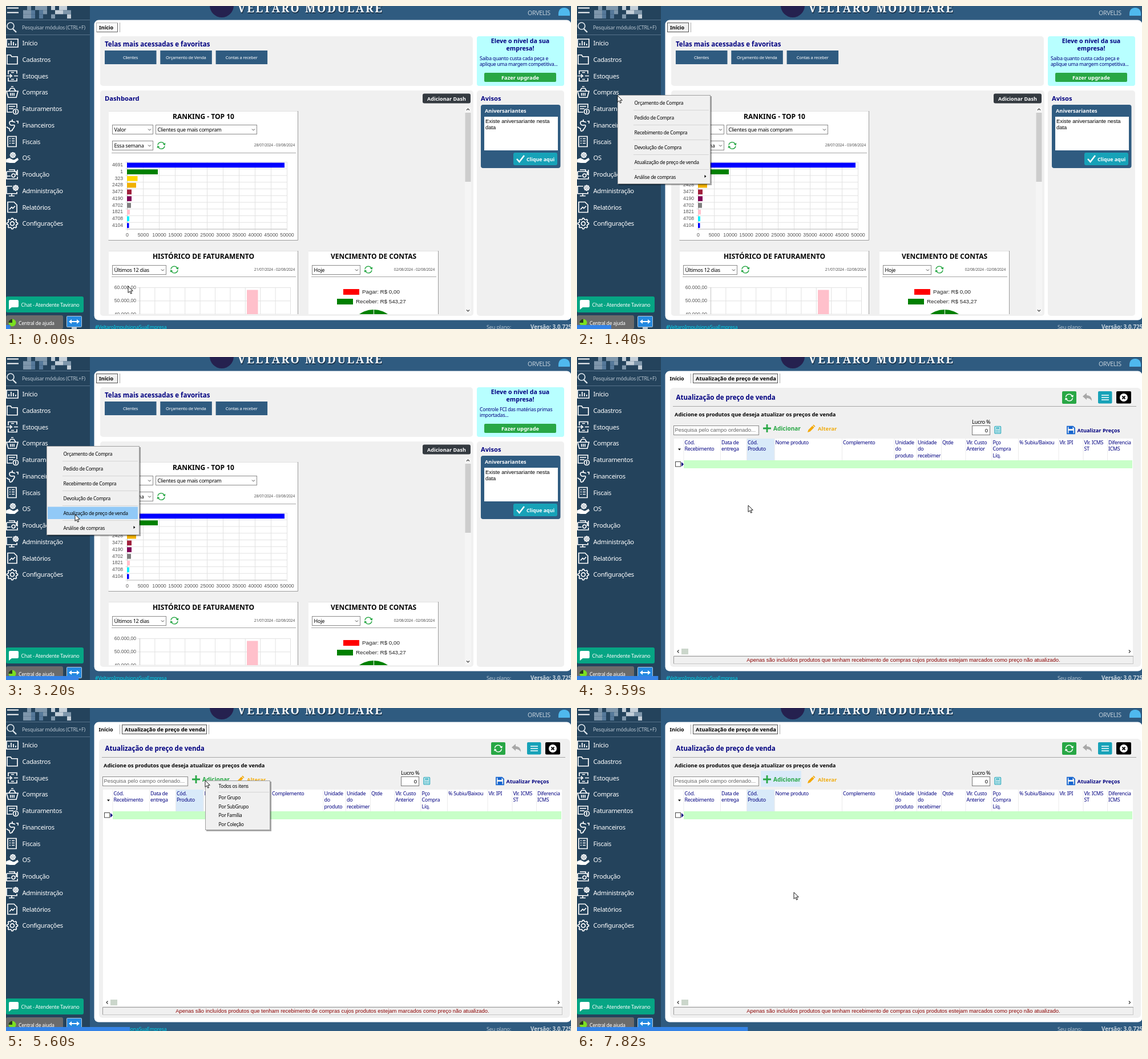
These frames come from a looping animation (990 by 566 pixels, 8000 ms). An HTML page:

```html
<!DOCTYPE html>
<html lang="pt">
<head>
<meta charset="utf-8">
<title>Painel de gestão</title>
<style>
html, body { margin: 0; width: 100%; height: 100%; overflow: hidden; background: #2f5b80; }
svg { display: block; width: 100%; height: 100%; }
text { font-family: "Noto Sans", "Open Sans", sans-serif; letter-spacing: -.03em; white-space: pre; }
.b { font-weight: 700; letter-spacing: 0; }
.a { font-family: "Liberation Sans", Arial, sans-serif; letter-spacing: 0; }
.m { text-anchor: middle; }
.e { text-anchor: end; }
.brand { font: 900 19.4px "Noto Serif", serif; letter-spacing: 2.6px; }
</style>
</head>
<body>
<svg id="stage" viewBox="0 0 990 566"></svg>
<script>
const NAVY = '#000080', BLUE = '#2f5b80', SIDE = '#24435c', GREY = '#f0f0f0',
      GREEN = '#28a745', TEAL = '#17a2b8', LINE = '#a5a5a5';

// Drawing helpers: each returns SVG markup
const box = (x, y, w, h, fill, r = 0, more = '') =>
  `<rect x="${x}" y="${y}" width="${w}" height="${h}" rx="${r}" fill="${fill}" ${more}/>`;
const frame = (x, y, w, h, color = '#8a8a8a', fill = '#fff') =>
  box(x + .5, y + .5, w - 1, h - 1, fill, 0, `stroke="${color}"`);
const stroke = (d, color, width = 1, more = '') =>
  `<path d="${d}" fill="none" stroke="${color}" stroke-width="${width}" ${more}/>`;
const shape = (d, fill, more = '') => `<path d="${d}" fill="${fill}" ${more}/>`;
const disc = (x, y, r, fill, more = '') => `<circle cx="${x}" cy="${y}" r="${r}" fill="${fill}" ${more}/>`;
const text = (x, y, s, size, fill = '#000', cls = '') =>
  `<text x="${x}" y="${y}" font-size="${size}" fill="${fill}" class="${cls}">${s}</text>`;
const at = (x, y, content) => `<g transform="translate(${x} ${y})">${content}</g>`;
const each = (list, fn) => list.map(fn).join('');
const range = n => [...Array(n).keys()];

const refresh = (x, y, color) => at(x, y,
  stroke('M-6-1A6 6 0 0 1 5-3M6 1A6 6 0 0 1-5 3', color, 1.4) +
  shape('M7.5-4.5L6.5 0 2.5-2.5ZM-7.5 4.5L-6.5 0-2.5 2.5Z', color));
const select = (x, y, w, label) =>
  frame(x, y, w, 17) + text(x + 3.5, y + 12, label, 9.1) +
  stroke(`M${x + w - 9} ${y + 7.5}l2.5 2.5 2.5-2.5`, '#444');

// Outlined cog with eight teeth
const gear = (x, y, r) => {
  const points = range(32).map(i => {
    const a = (i - .5) * Math.PI / 16, d = (i >> 1) % 2 ? r * .78 : r;
    return `${(x + d * Math.cos(a)).toFixed(2)},${(y + d * Math.sin(a)).toFixed(2)}`;
  });
  return `<polygon points="${points.join(' ')}"/>` + disc(x, y, r * .36, 'none');
};
const p = d => `<path d="${d}"/>`;
const MENU = [
  ['Início', p('M-10-7H10V7H-10ZM-6 4V0M-2 4V-4M2 4V-2M6 4V1')],
  ['Cadastros', p('M-9 8V-8H-3L-1-5H9V8Z')],
  ['Estoques', p('M-7-3V-9H8V-4M-7 3V9H8V4M-10 0H-1L-4-3M-1 0L-4 3M10 0H3M-2-6H3M-2 6H3')],
  ['Compras', p('M-10-2H10L7 9H-7ZM-6-2L-3-7H3L6-2M-3 1V6M0 1V6M3 1V6M-2-10H2')],
  ['Faturamentos', p('M8-1V-8H-9V6H0M-6-4H5M-6 0H2') + disc(6, 5, 4.5, 'none') + p('M6 2V8')],
  ['Financeiros', p('M5-5Q-5-9-5-4T1 0 1 7-5 5M0-10V-7M0 7V10M-10 3L-6 6M7-7H10V-3')],
  ['Fiscais', p('M-8-9H7V9H-8ZM-5-5H-3M-1-5H4M-5-1H-3M-1-1H4M-5 3H-3M-1 3H4')],
  ['OS', gear(1, -5, 4.5) + `<path d="M-10 3L-5 1 1 4H4L9 1 10 3 4 8H-4L-10 7Z" fill="#fff"/>`],
  ['Produção', p('M-10-5H7V1M-10-5V8H9V4M-6-8H4V-5M-10 3H-3M9-8V2') + disc(2, 2, 3, 'none')],
  ['Administração', p('M8 2V5H-10V-8H0M-1 5V9M-6 9H4') + gear(6, -5, 4.5)],
  ['Relatórios', p('M-8-9H3L8-4V9H-8ZM-5 4L-1 0 1 2 5-2')],
  ['Configurações', gear(0, 0, 9.5)]
];
const itemY = i => 65 + 28.75 * i;
const menuItem = (i, cls = '') =>
  at(11, itemY(i), `<g fill="none" stroke="#fff" stroke-width="1.7">${MENU[i][1]}</g>`) +
  text(28.5, itemY(i) + 4.2, MENU[i][0], 11.2, '#fff', cls);

function mosaic() {
  const tones = [SIDE, SIDE, '#7f97ac', '#c3ced8', '#56799a'];
  return each(range(36), i => {
    const n = Math.abs(Math.sin(i * 12.99 + 3) * 43758.5) % 1;
    return box(30 + i % 12 * 7, Math.floor(i / 12) * 7.3, 7, 7.3, tones[Math.floor(n * 5)]);
  });
}

const shell = () =>
  box(0, 0, 990, 566, BLUE) + box(0, 0, 147, 566, SIDE) +
  stroke('M2 3.5H22M2 11.5H22', '#fff', 2) + mosaic() +
  stroke('M0 24.5H147M0 50.5H147', '#56728a') +
  disc(8, 35, 6, 'none', 'stroke="#dfe6ec" stroke-width="1.7"') + stroke('M12 40L18 46', '#dfe6ec', 2.4) +
  text(28, 41, 'Pesquisar módulos (CTRL+F)', 8.9, '#b9c6d1') +
  each(range(MENU.length), i => menuItem(i)) +
  box(0, 509, 136, 28, '#06a584', 3) + shape('M7 515H20Q22 515 22 517V526Q22 528 20 528H10L5 532V517Q5 515 7 515Z', '#fff') +
  text(26.5, 527, 'Chat - Atendente Tavirano', 8.95, '#fff') +
  box(0, 542, 100, 24, '#6b6b6b', 3) + disc(11, 555, 6.5, '#7be01f') + shape('M11 555V548.5A6.5 6.5 0 0 0 4.5 555Z', '#2b3a20') +
  text(22, 559, 'Central de ajuda', 8.7, '#fff') +
  box(106.5, 543.5, 26, 19, '#2489e0', 1, 'stroke="#b9c8d4"') + box(115, 563, 9, 3, '#b9c8d4') +
  stroke('M112 553H127', '#fff', 2) + shape('M110 553L115 549V557ZM129 553L124 549V557Z', '#fff') +
  disc(378, -1, 21, '#25214f') +
  text(407, 12.5, 'VELTARO MODULARE', 19.4, '#1b3349', 'brand') + text(406, 11, 'VELTARO MODULARE', 19.4, '#fff', 'brand') +
  text(914, 15.5, 'ORVELIS', 10.6, '#c3d0da') +
  shape('M968 17Q967 3 978 3T988 17Z', '#4fb9ee') +
  text(156, 566, '#VeltaroImpulsionaSuaEmpresa', 8.8, '#00d5e8') +
  text(842, 566, 'Seu plano:', 9.3, '#b4c4d0') + text(919, 566, 'Versão: 3.0.725', 9.8, '#c9d5de', 'b') +
  box(154.5, 24.6, 836, 526, '#fff', 8);

const card = (x, y, w, h, title) =>
  box(x, y, w, h, '#fff') + stroke(`M${x} ${y + .5}h${w}`, '#e2e2e2') +
  stroke(`M${x + w - .5} ${y}v${h - .5}h${-w}`, '#9c9c9c') +
  text(x + w / 2, y + 14, title, 12, '#000', 'b m');
const dates = (x, y, s) => text(x, y, s, 6.6, '#555', 'e');

function ranking() {
  const rows = [
    ['4691', 276, '#00f'], ['1', 54, '#008000'], ['323', 18.5, '#ffd700'], ['2428', 16, '#f0b000'],
    ['3472', 8, '#a0203c'], ['4190', 8, '#800055'], ['4702', 7, '#808080'], ['1821', 5, '#ffc0cb'],
    ['4708', 4, '#00f0ff'], ['4104', 3.5, '#00f']
  ];
  const step = 11.75;
  return card(180, 184, 332, 227, 'RANKING - TOP 10') +
    select(186, 208, 72, 'Valor') + select(262, 208, 178, 'Clientes que mais compram') +
    select(186, 236, 72, 'Essa semana') + refresh(272, 244.5, GREEN) +
    dates(506, 246, '28/07/2024 - 03/08/2024') + stroke('M185 257.5H508', LINE) +
    each(range(11), i => stroke(`M${212.5 + i * 28} 273V394M209 ${273.5 + i * step}H492`, '#e2e2e2') +
      text(212.5 + i * 28, 404, i * 5000, 8.8, '#555', 'a m')) +
    stroke('M212.5 273V391H492', '#c4c4c4') +
    each(rows, ([id, w, color], i) => box(212, 274.6 + i * step, w, 8.6, color) +
      text(205, 281 + i * step, id, 8.6, '#555', 'a e'));
}

const history = () =>
  card(180, 429, 332, 130, 'HISTÓRICO DE FATURAMENTO') + select(186, 454, 95, 'Últimos 12 dias') +
  refresh(295, 462, GREEN) + dates(506, 463.5, '21/07/2024 - 02/08/2024') + stroke('M185 474.5H508', LINE) +
  each(range(11), i => stroke(`M${234.5 + i * 26.4} 493V545`, '#e2e2e2')) +
  each(range(3), i => stroke(`M230 ${493.5 + i * 23.3}H498`, '#e2e2e2') +
    text(228, 496 + i * 23.3, `${60 - i * 10}.000,00`, 8.6, '#555', 'a e')) +
  stroke('M234.5 493V545', '#c4c4c4') + box(422, 497.5, 19.5, 50, '#ffc0cb');

const dues = () =>
  card(530, 429, 228, 130, 'VENCIMENTO DE CONTAS') + select(536, 454, 85, 'Hoje') +
  refresh(635, 462, GREEN) + dates(751, 463.5, '02/08/2024 - 02/08/2024') + stroke('M535 474.5H754', LINE) +
  box(591, 496, 28, 10, '#f00') + text(624, 504, 'Pagar: R$ 0,00', 9.8, '#222', 'a') +
  box(580, 513, 28, 10, '#008000') + text(613, 521, 'Receber: R$ 543,27', 9.8, '#222', 'a') +
  disc(644, 575, 43, '#008000') + stroke('M644.5 531V545', '#fff');

const home = () =>
  box(165, 53, 653, 87, GREY, 5) + text(173, 71, 'Telas mais acessadas e favoritas', 11.5, NAVY, 'b') +
  each(['Clientes', 'Orçamento de Venda', 'Contas a receber'], (s, i) =>
    box(173 + i * 97.3, 78, 90.5, 24, BLUE) + text(218 + i * 97.3, 93, s, 7.5, '#fff', 'm')) +
  box(825, 53, 153, 87, '#b8ffff', 4) +
  text(901, 65, 'Eleve o nível da sua', 10.6, NAVY, 'b m') + text(901, 78, 'empresa!', 10.6, NAVY, 'b m') +
  box(838, 117, 126, 16, GREEN, 2) + text(901, 128.7, 'Fazer upgrade', 9.25, '#fff', 'b m') +
  box(165, 148, 654, 395, GREY, 5) + text(173, 166, 'Dashboard', 11.2, NAVY, 'b') +
  box(730, 153.5, 84, 17, '#343a40', 3) + text(772, 165.5, 'Adicionar Dash', 9, '#fff', 'b m') +
  box(804, 177, 11, 363, '#f5f5f5') + box(804.5, 187, 10, 121, '#cdcdcd') +
  stroke('M807 182.5l2.5-2.5 2.5 2.5M807 532.5l2.5 2.5 2.5-2.5', '#444', 1.2) +
  `<clipPath id="board"><path d="M165 148H819V540H165Z"/></clipPath>` +
  `<g clip-path="url(#board)">${ranking() + history() + dues()}</g>` +
  box(825, 148, 153, 395, GREY, 5) + text(832, 166, 'Avisos', 11.2, NAVY, 'b') +
  box(832, 173, 139.5, 111, BLUE, 4) + text(839, 187, 'Aniversariantes', 9.2, '#fff', 'b') +
  box(838, 194, 129, 59, '#fff') + text(840, 205, 'Existe aniversariante nesta', 9.4, '#000', 'a') +
  text(840, 216, 'data', 9.4, '#000', 'a') +
  box(889, 257, 77, 22, TEAL, 3) + stroke('M895 268L899.5 273 908 262', '#fff', 2.6) +
  text(912, 271.5, 'Clique aqui', 8.8, '#fff', 'b');

const COLUMNS = [
  [188.5, 'Cód.', 'Recebimento'], [253, 'Data de', 'entrega'], [299, 'Cód.', 'Produto'], [347.5, 'Nome produto'],
  [466, 'Complemento'], [557.5, 'Unidade', 'do', 'produto'], [597, 'Unidade', 'do', 'recebimer'], [640, 'Qtde'],
  [682.5, 'Vlr. Custo', 'Anterior'], [728.5, 'Pço', 'Compra', 'Líq.'], [775, '% Subiu/Baixou'],
  [845.5, 'Vlr. IPI'], [888.5, 'Vlr. ICMS', 'ST'], [931, 'Diferencia', 'ICMS']
];

const form = hot =>
  box(163, 54, 825, 489, GREY, 6) + text(173.5, 75, 'Atualização de preço de venda', 11.5, NAVY, 'b') +
  stroke('M168 86.5H980', LINE) +
  box(850, 60, 25, 22, GREEN, 2) + refresh(862.5, 71, '#fff') +
  shape('M886 69L893 63V67Q902 67 902 77 899 72 893 72V75Z', '#a8a8a8') +
  box(913, 60, 24.5, 21.5, TEAL, 2) + stroke('M919 67H932M919 71H932M919 75H932', '#fff', 1.4) +
  box(945, 60, 26, 21.5, '#000', 2) + disc(958, 71, 7, '#fff') + stroke('M955.5 68.5l5 5m0-5l-5 5', '#000', 1.8) +
  text(171, 104, 'Adicione os produtos que deseja atualizar os preços de venda', 9.26, '#000', 'b') +
  frame(169, 120, 150, 17) + text(171.5, 131.3, 'Pesquisa pelo campo ordenado...', 9.5, '#666', 'a') +
  (hot ? box(322, 110, 71, 28, '#d9eaf9') : '') +
  stroke('M333 118V132M326 125H340', GREEN, 2.8) + text(344, 128.6, 'Adicionar', 10, GREEN, 'b') +
  shape('M404 132L405.5 127.5 412.5 120.5 415.5 123.5 408.5 130.5ZM413.3 119.7L414.5 118.5 417.5 121.5 416.3 122.7Z', '#f5a800') +
  text(422, 128.6, 'Alterar', 9.5, '#f0ac10', 'b') +
  text(692, 116.5, 'Lucro %', 9.3) + frame(692, 120, 32, 17, '#777') + text(720, 131.5, '0', 9.5, '#000', 'a e') +
  box(732, 121.5, 10.5, 12.5, '#e4f5f7', 1, `stroke="${TEAL}" stroke-width="1.2"`) + box(734, 123.5, 6.5, 2, TEAL) +
  each(range(9), i => box(733.8 + i % 3 * 2.6, 127 + Math.floor(i / 3) * 2.2, 1.6, 1.3, TEAL)) +
  stroke('M859 121.7H869L872 124.5V134.3H859Z', '#1766d0', 1.8) + box(861.5, 121.5, 7, 4.5, '#1766d0') + box(861.5, 129, 8, 5, '#1766d0') +
  text(876.5, 131.5, 'Atualizar Preços', 9.25, NAVY, 'b') +
  box(170, 143, 804, 379, '#fff') + box(298, 143, 48.5, 38, '#d9eaf9') +
  box(187, 181, 786, 14, '#c8ffc8') +
  each(COLUMNS, ([x, ...lines]) => stroke(`M${x - 1.5} 143V181`, '#ebebeb') +
    each(lines, (s, i) => text(x, 153 + i * 11.3, s, 8.9, NAVY))) +
  shape('M177 160.5H182L179.5 163.5Z', '#000') +
  frame(172, 183, 10, 9.5, '#444') + shape('M183 184L187 188 183 192Z', NAVY) +
  stroke('M178.5 513.5L176 516l2.5 2.5M967 513.5l2.5 2.5-2.5 2.5', '#333', 1.2) +
  box(183, 511, 12, 10, '#cbd6cb') +
  frame(169, 524, 806, 14, '#c8c8c8', GREY) + stroke('M169.5 537V524.5H975', '#999') +
  text(572, 534, 'Apenas são incluídos produtos que tenham recebimento de compras cujos produtos estejam marcados como preço não atualizado.', 9.44, '#8b0000', 'a m');

const tabs = (onForm, focused) => onForm
  ? text(162.5, 41, 'Início', 9, '#000', 'b') + frame(203, 29, 149, 17, '#555', GREY) +
    text(208, 41.3, 'Atualização de preço de venda', 9.3, '#000', 'b') + stroke('M199.5 29V46M355.5 29V46', '#aaa')
  : frame(158, 29, 38, 17, focused ? '#555' : '#b5b5b5', focused ? GREY : '#fafafa') +
    (focused ? '' : stroke('M159 45.5H195.5V30', '#666')) +
    text(163, 41, 'Início', 9, '#000', 'b') + stroke('M199.5 29V46', '#aaa');

const popup = (x, y, w, h) => box(x + 2, y + 2, w, h, '#000', 0, 'opacity=".35"') + frame(x, y, w, h, '#a0a0a0', GREY);

const PURCHASES = ['Orçamento de Compra', 'Pedido de Compra', 'Recebimento de Compra', 'Devolução de Compra',
  'Atualização de preço de venda', 'Análise de compras'];
const purchaseMenu = hot => popup(71, 156, 163, 156) +
  each(PURCHASES, (s, i) => (i ? stroke(`M99 ${156.5 + i * 26}H231`, '#d5d5d5') : '') +
    (i === hot ? box(73, 158.5 + i * 26, 158, 21.5, '#91c9f7') : '') + text(100.5, 172.7 + i * 26, s, 8.45)) +
  shape('M223.5 296L226.5 298.5 223.5 301Z', '#000');

const addMenu = hot => popup(349, 127, 114, 87) + (hot ? box(350.5, 129.5, 111, 15, '#91c9f7') : '') +
  text(372.5, 140, 'Todos os itens', 8.4) + stroke('M372 147.5H461', '#d5d5d5') +
  each(['Por Grupo', 'Por SubGrupo', 'Por Família', 'Por Coleção'], (s, i) => text(372.5, 160 + i * 15.5, s, 8.4));

const ARROW = 'M0 0V11.5L2.7 9 4.6 13.2 6.5 12.4 4.6 8.2H8.3Z';
const HAND = 'M-1 1.2Q0-.6 1.2 1.2V5.5L6.5 7Q8 7.6 7.6 9.5L6.5 14.5H.5L-4 9Q-3.6 6.8-1 8.8Z';

// Cursor stops: time, x, y
const PATH = [[0, 214, 491], [200, 205, 465], [600, 105, 250], [800, 79, 187], [1000, 72, 161], [1200, 71, 157],
  [1600, 71, 157], [2000, 112, 179], [2200, 119, 183], [2400, 121, 200], [3000, 121, 270], [3200, 121, 276],
  [3400, 121, 276], [3600, 300, 260], [4000, 508, 225], [4600, 358, 152], [4800, 344, 143], [5000, 347, 134],
  [5200, 349, 127], [5600, 349, 127], [6200, 367, 136], [6600, 368, 137], [7200, 380, 323], [8000, 380, 323]];

function cursorAt(t) {
  const i = Math.max(1, PATH.findIndex(stop => stop[0] >= t));
  const [t0, x0, y0] = PATH[i - 1], [t1, x1, y1] = PATH[i];
  const k = (t - t0) / (t1 - t0);
  return [x0 + (x1 - x0) * k, y0 + (y1 - y0) * k];
}

function scene(t) {
  const [x, y] = cursorAt(t);
  const onForm = t >= 3600, purchasesOpen = t >= 1400 && t < 3600, addOpen = t >= 5400 && t < 6800;
  const hovered = !purchasesOpen && x < 147 ? Math.round((y - 65) / 28.75) : -1;
  const overItem = hovered >= 0 && hovered < MENU.length;
  const addHot = t >= 5000 && !addOpen;
  const advert = t < 1600 ? ['Saiba quanto custa cada peça e', 'aplique uma margem competitiva...']
    : ['Controle FCI das matérias primas', 'importadas...'];

  let out = tabs(onForm, purchasesOpen);
  out += onForm ? form(addHot) : home() + each(advert, (s, i) => text(830, 95 + i * 10, s, 8.7, NAVY));
  if (overItem) out += box(.5, itemY(hovered) - 12, 143.5, 24, '#3399ff', 3, 'stroke="#16324a"') + menuItem(hovered, 'b');
  if (purchasesOpen) out += purchaseMenu(x > 73 ? Math.floor((y - 157.5) / 26) : -1);
  if (addOpen) out += addMenu(x > 350);
  out += box(0, 559, 7.6 + t * .0374, 7, '#3583e6');
  return out + at(x, y, shape(overItem ? HAND : ARROW, '#fff', 'stroke="#000" stroke-width=".9"'));
}

const stage = document.getElementById('stage');
stage.innerHTML = shell() + '<g id="live"></g>';
const live = document.getElementById('live');
let shown = -1;

function play() {
  const tick = Math.min(7800, Math.floor((performance.now() % 8000 + 10) / 200) * 200);
  if (tick !== shown) live.innerHTML = scene(shown = tick);
  requestAnimationFrame(play);
}
play();
</script>
</body>
</html>
```
